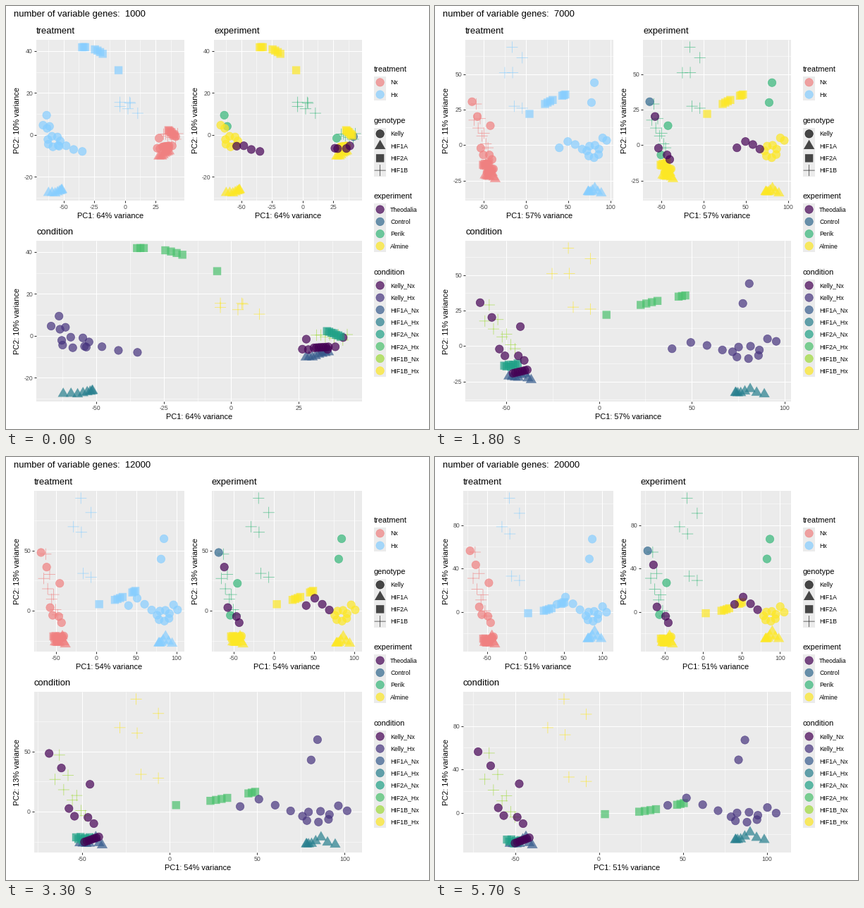
A matplotlib script that plays this animation: 600x600 px, repeating every 6 s.

```python
import numpy as np
import matplotlib.pyplot as plt
from matplotlib.animation import FuncAnimation
from matplotlib.collections import PathCollection
from matplotlib.colors import to_rgba
from matplotlib.patches import Rectangle
from matplotlib.path import Path
from matplotlib.transforms import IdentityTransform

plt.rcParams["font.family"] = "Liberation Sans"
SIZE, DPI, FRAMES, STEP = 600, 72, 20, 300
ALPHA = 0.7
rng = np.random.default_rng(4)

TREATMENT = {"Nx": "#F08080", "Hx": "#87CEFF"}
EXPERIMENT = {"Theodalia": "#440154", "Control": "#31688E",
              "Perik": "#35B779", "Almine": "#FDE725"}
CONDITION = {"Kelly_Nx": "#440154", "Kelly_Hx": "#46337E",
             "HIF1A_Nx": "#365C8D", "HIF1A_Hx": "#277F8E",
             "HIF2A_Nx": "#1FA187", "HIF2A_Hx": "#4AC16D",
             "HIF1B_Nx": "#9FDA3A", "HIF1B_Hx": "#FDE725"}

# Marker outlines in pixels, y up
R = 5.69
MARKS = {
    "Kelly": Path.circle((0, 0), R),
    "HIF1A": Path([(0, 8.85), (7.66, -4.42), (-7.66, -4.42), (0, 8.85)], closed=True),
    "HIF2A": Path([(-R, -R), (R, -R), (R, R), (-R, R), (-R, -R)], closed=True),
    "HIF1B": Path([(-8.05, 0), (8.05, 0), (0, -8.05), (0, 8.05)], [1, 2, 1, 2]),
}
EDGE = {"Kelly": 0.7, "HIF1A": 0, "HIF2A": 0, "HIF1B": 0.8}

PC1 = [64, 62, 61, 60, 59, 58, 57, 56, 56, 55, 55, 54, 54] + [53] * 6 + [51]
PC2 = [10] + [11] * 6 + [12] * 3 + [13] * 6 + [14] * 4
Y_STEP = [20] * 3 + [25] * 5 + [40, 30, 30, 50, 30, 30] + [40] * 6

# PC1 spread and the weights of the two axes that PC2 mixes, by gene count
COUNT = [1, 3, 7, 10, 12, 16, 20]
SPREAD = [0.632, 0.785, 0.905, 0.94, 0.96, 0.985, 1]
TAIL = [-0.09, 0, 0.485, 0.745, 0.84, 0.95, 1]
ARM = [0.86, 1, 0.63, 0.3, 0.18, 0.08, 0]

samples, parts = [], []


def add(condition, experiment, x, tail, arm, pull=0):
    """x: PC1 at full spread; tail, arm: PC2 parts; pull: where PC1 contracts to."""
    part = np.array(np.broadcast_arrays(x, tail, arm, pull), float)
    parts.append(part)
    samples.extend([(condition, experiment)] * part.shape[1])


def ramp(n):
    return np.linspace(0, 1, n)


def bump(x, mid, width):
    return np.exp(-((x - mid) / width) ** 2)


# Scattered samples
u = ramp(8)
zigzag = 17 * (1 - u) * (-1) ** np.arange(8)
add("HIF1B_Nx", "Perik", -68 + 18 * u, 48 - 52 * u - zigzag, 4 - 4 * u)
add("HIF1B_Hx", "Perik", [-30.5, -20.2, -20.8, -7.6, -17.9, -7.6],
    [78.6, 72, 105, 91, 33, 29], [20.3, 25.6, 28.6, 27.6, 18, 18.9], 24)
add("Kelly_Nx", "Control", [-72], 56.4, 5, 11)
add("Kelly_Nx", "Perik", [-47.5, -56.7], [26.8, -2.6], [1, -9], 6)
add("Kelly_Hx", "Perik", [83.2, 87], [48.9, 67.2], [9.9, 18], 24)

# Clusters and chains
x = -53 + 13.3 * u
add("HIF1A_Nx", "Almine", x, -28.5 - 1.5 * u + 8 * bump(x, -44, 2), -12 - 3 * u, -7)
x = 81.3 + 17.2 * u ** 2
add("HIF1A_Hx", "Almine", x, -25 + 7 * bump(x, 90, 3.5), -33 - 1.7 * u)

u = ramp(7)
add("HIF2A_Nx", "Almine", -54.8 + 8 * u, -26.5 + rng.uniform(-2, 2, 7), -3 + 3 * u, -16)
x = np.concatenate([[3.6], 24 + 10 * ramp(4), 46.6 + 4 * ramp(3)])
add("HIF2A_Hx", "Almine", x, -1.3 + 10 * (x / 50) ** 2, 49.6 - 16 * (1 - x / 51) ** 2, 8)

add("Kelly_Nx", "Almine", -50 + 8.5 * u, -28 + 5 * u, -9, -12)
ring = np.radians(-30 + 360 / 7 * np.arange(7))
add("Kelly_Hx", "Almine", 87 + 8.3 * np.cos(ring), -4 + 4.7 * np.sin(ring),
    -4 + 3.5 * np.sin(ring), 8)
add("Kelly_Hx", "Almine", [105.6, 100.4], [-0.3, 4.9], [5.4, 4.2])
add("Kelly_Nx", "Theodalia", [-64.5, -60, -48.7, -45.2], [43.4, 4.6, -4, -10],
    [-1.5, -7, -8, -8.4], 6)
add("Kelly_Hx", "Theodalia", 41 + 30 * ramp(4) ** 0.9, [6.9, 13.7, 7.5, 2],
    [-8.4, -6.6, -5.2, -6], 24)

X, TAIL_POS, ARM_POS, PULL = np.concatenate(parts, axis=1)
GENO = [c.split("_")[0] for c, _ in samples]
BY_TREATMENT = [TREATMENT[c.split("_")[1]] for c, _ in samples]
BY_EXPERIMENT = [EXPERIMENT[e] for _, e in samples]
BY_CONDITION = [CONDITION[c] for c, _ in samples]

fig = plt.figure(figsize=(SIZE / DPI, SIZE / DPI), dpi=DPI, facecolor="white")
ax = fig.add_axes([0, 0, 1, 1])


def scores(n):
    """Sample coordinates for n thousand genes; PC1 starts out mirrored."""
    spread, tail, arm = (np.interp(n, COUNT, v) for v in (SPREAD, TAIL, ARM))
    x = spread * X + (1 - spread) * PULL
    return np.column_stack([-x if n == 1 else x, tail * TAIL_POS + arm * ARM_POS])


def write(x, y, text, size, color="black", ha="left", **kw):
    ax.text(x, y, text, size=size, color=color, ha=ha, va="baseline", **kw)


def box(x, y, w, h):
    ax.add_patch(Rectangle((x, y), w, h, fc="#EBEBEB", lw=0, zorder=0))


def line(xs, ys, color, width):
    ax.plot(xs, ys, color=color, lw=width, zorder=1, solid_capstyle="butt")


def marks(xy, genos, colors):
    rgba = [to_rgba(c, ALPHA) for c in colors]
    face = ["none" if g == "HIF1B" else c for g, c in zip(genos, rgba)]
    pts = PathCollection([MARKS[g] for g in genos], offsets=xy,
                         offset_transform=ax.transData,
                         transform=IdentityTransform(),
                         facecolors=face, edgecolors=rgba,
                         linewidths=[EDGE[g] for g in genos], zorder=2)
    pts.set_snap(False)
    ax.add_collection(pts, autolim=False)


def breaks(lo, hi, step):
    return np.arange(np.ceil(lo / step), np.floor(hi / step) + 1) * step


def panel(k, title, left, right, top, xy, lo, hi, steps, label_x, colors):
    bottom = top + 228
    box(left, top, right - left, 228)

    def px(v):
        return left + (v - lo[0]) / (hi[0] - lo[0]) * (right - left)

    def py(v):
        return bottom - (v - lo[1]) / (hi[1] - lo[1]) * 228

    for part, width in ((0.5, 0.53), (1, 1.07)):
        for v in breaks(lo[0], hi[0], steps[0] * part):
            line([px(v)] * 2, [top, bottom], "white", width)
        for v in breaks(lo[1], hi[1], steps[1] * part):
            line([left, right], [py(v)] * 2, "white", width)
    for v in breaks(lo[0], hi[0], steps[0]):
        line([px(v)] * 2, [bottom, bottom + 2.75], "#333333", 1.07)
        write(px(v), bottom + 12.3, f"{int(v)}", 8.8, "#4D4D4D", "center")
    for v in breaks(lo[1], hi[1], steps[1]):
        line([left - 2.75, left], [py(v)] * 2, "#333333", 1.07)
        write(left - 5, py(v) + 3.15, f"{int(v)}", 8.8, "#4D4D4D", "right")

    marks(np.column_stack([px(xy[:, 0]), py(xy[:, 1])]), GENO, colors)
    write(left, top - 9, title, 13)
    write((left + right) / 2, bottom + 25, f"PC1: {PC1[k]}% variance", 11, ha="center")
    write(label_x, top + 114, f"PC2: {PC2[k]}% variance", 11, ha="center",
          rotation=90, rotation_mode="anchor")


def legend(title, baseline, first, entries):
    write(522, baseline, title, 11)
    ys = [first + 17.28 * i for i in range(len(entries))]
    box(522, first - 8.64, 17.28, 17.28 * len(entries))
    marks([(530.6, y) for y in ys], [g for _, g, _ in entries],
          [c for _, _, c in entries])
    for y, (name, _, _) in zip(ys, entries):
        write(545, y + 3.15, name, 8.8)


def dots(palette):
    return [(name, "Kelly", c) for name, c in palette.items()]


def draw(k):
    ax.clear()
    ax.set(xlim=(0, SIZE), ylim=(SIZE, 0))
    ax.axis("off")
    xy = scores(k + 1)
    lo, hi = xy.min(axis=0), xy.max(axis=0)
    pad = (hi - lo) * 0.05
    lo, hi = lo - pad, hi + pad
    steps = (25 if k == 0 else 50, Y_STEP[k])
    # A minus sign among the y labels pushes the panels right
    left = 43 if lo[1] <= -steps[1] else 40

    write(11, 15, f"number of variable genes:  {(k + 1) * 1000}", 13)
    view = (xy, lo, hi, steps)
    panel(k, "treatment", left, 253, 48, *view, 19, BY_TREATMENT)
    panel(k, "experiment", left + 252, 505, 48, *view, 272, BY_EXPERIMENT)
    panel(k, "condition", left, 505, 333, *view, 19, BY_CONDITION)

    legend("treatment", 93, 108.3, dots(TREATMENT))
    legend("genotype", 166, 181.3, [(g, g, "black") for g in MARKS])
    legend("experiment", 273, 288.6, dots(EXPERIMENT))
    legend("condition", 381, 396.4, dots(CONDITION))
    return []


anim = FuncAnimation(fig, draw, frames=FRAMES, interval=STEP,
                     init_func=lambda: [], repeat=True, repeat_delay=0)
plt.show()
```
